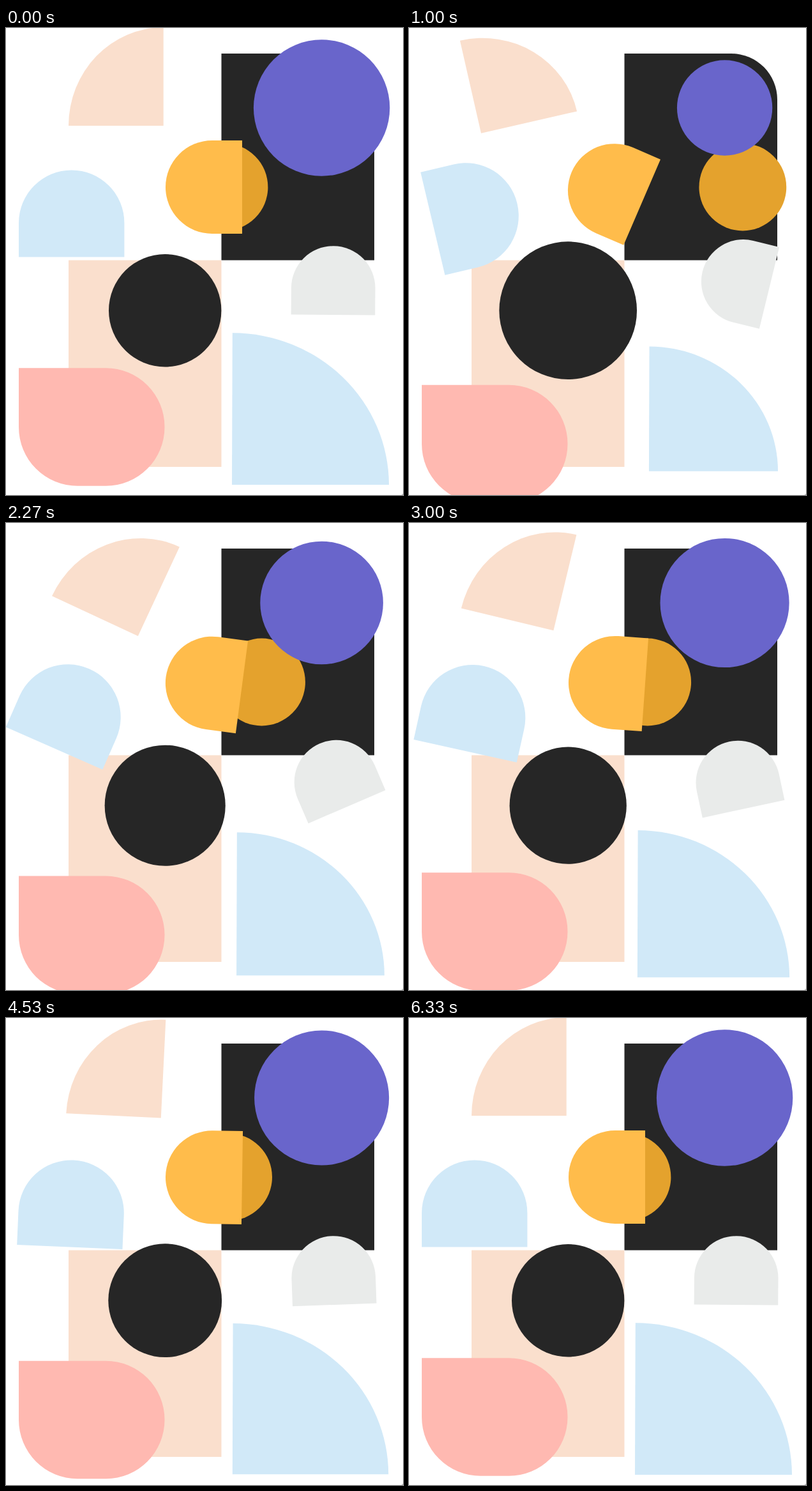
These frames come from a looping animation (622x731 px, 6990 ms). An HTML page:

```html
<!DOCTYPE html>
<html lang="en">
<head>
<meta charset="utf-8">
<title>Geometric shapes</title>
<style>
  html, body { margin: 0; width: 100%; height: 100%; overflow: hidden; background: #fff; }
  svg { display: block; width: 622px; height: 731px; }
</style>
</head>
<body>
<svg viewBox="0 0 622 731" xmlns="http://www.w3.org/2000/svg">
  <path fill="#262626" d="M337.5 40H505A72 72 0 0 1 577 112V363.5H337.5Z"/>
  <rect fill="#fadfcd" x="98" y="363.5" width="239.5" height="323.5"/>
  <path id="fan" fill="#fadfcd" d="M246.7 153H98A148.7 154 0 0 1 246.7 -1Z"/>
  <path id="arch" fill="#d1e9f8" d="M20 358.5V305.2A82.7 82.7 0 0 1 185.4 305.2V358.5Z"/>
  <circle id="amber" fill="#e4a22d" cx="342" cy="249" r="68.4"/>
  <path id="tab" fill="#ffbc4b" d="M370 176H323A73 73 0 0 0 323 322H370Z"/>
  <circle id="violet" fill="#6965cb" cx="494.6" cy="125" r="106.7"/>
  <path id="dome" fill="#e9ebea" d="M447 449V407A65.8 65.8 0 0 1 578.6 407V449Z"/>
  <circle id="disc" fill="#262626" cx="249.2" cy="442.2" r="88.2"/>
  <path id="quarter" fill="#d1e9f8" d="M354 715L354.8 477.3A245.5 238 0 0 1 600 715Z"/>
  <path id="leaf" fill="#ffb9b1" d="M20 532.3H156.5A92 92 0 0 1 248.5 624.3V624.8A92 92 0 0 1 156.5 716.8H112A92 92 0 0 1 20 624.8Z"/>
  <rect fill="#c4c4c4" x="620" y="729.5" width="2" height="1.5"/>
</svg>
<script>
const LOOP = 6990, STEP = 1000 / 15, START = 60, SPAN = 6170;
const $ = id => document.getElementById(id);

// CSS-style cubic Bezier with y handles at 0 and 1
function bezier(x1, x2) {
  return x => {
    if (x <= 0) return 0;
    if (x >= 1) return 1;
    let lo = 0, hi = 1;
    for (let i = 0; i < 30; i++) {
      const s = (lo + hi) / 2, r = 1 - s;
      if (3 * r * r * s * x1 + 3 * r * s * s * x2 + s ** 3 < x) lo = s; else hi = s;
    }
    return lo * lo * (3 - 2 * lo);
  };
}
const settle = bezier(0.335, 0);
const drift = bezier(0.42, 0.58);

const place = (id, value) => $(id).setAttribute("transform", value);
const spin = (id, deg, x, y) => place(id, `rotate(${deg} ${x} ${y})`);
const zoom = (id, k, x, y) => place(id, `translate(${x} ${y}) scale(${k}) translate(${-x} ${-y})`);
const slide = (id, x, y) => place(id, `translate(${x} ${y})`);

function draw(ms) {
  const tick = Math.floor((ms + 4) / STEP);
  // the loop opens at rest, then jumps to the displaced pose
  const x = tick === 0 ? 1 : (tick * STEP - START) / SPAN;
  const p = 1 - settle(x);
  const turn = 90 * p ** 1.04;

  spin("fan", 90 * p, 172.5, 75);
  spin("arch", turn, 103, 291);
  spin("dome", 0.4 - turn, 511.8, 395);
  spin("tab", 27.2 * p, 310, 249);
  slide("amber", 211 * p, 0);
  zoom("violet", 1 - 0.35 * p, 494.6, 125);
  zoom("disc", 1 + 0.26 * p, 249.2, 442.2);
  zoom("quarter", 1 - 0.208 * p, 477, 596);
  slide("leaf", 0, 27.7 * (1 - drift(x)));
}

const began = performance.now();
function frame() {
  draw((performance.now() - began) % LOOP);
  requestAnimationFrame(frame);
}
frame();
</script>
</body>
</html>
```
